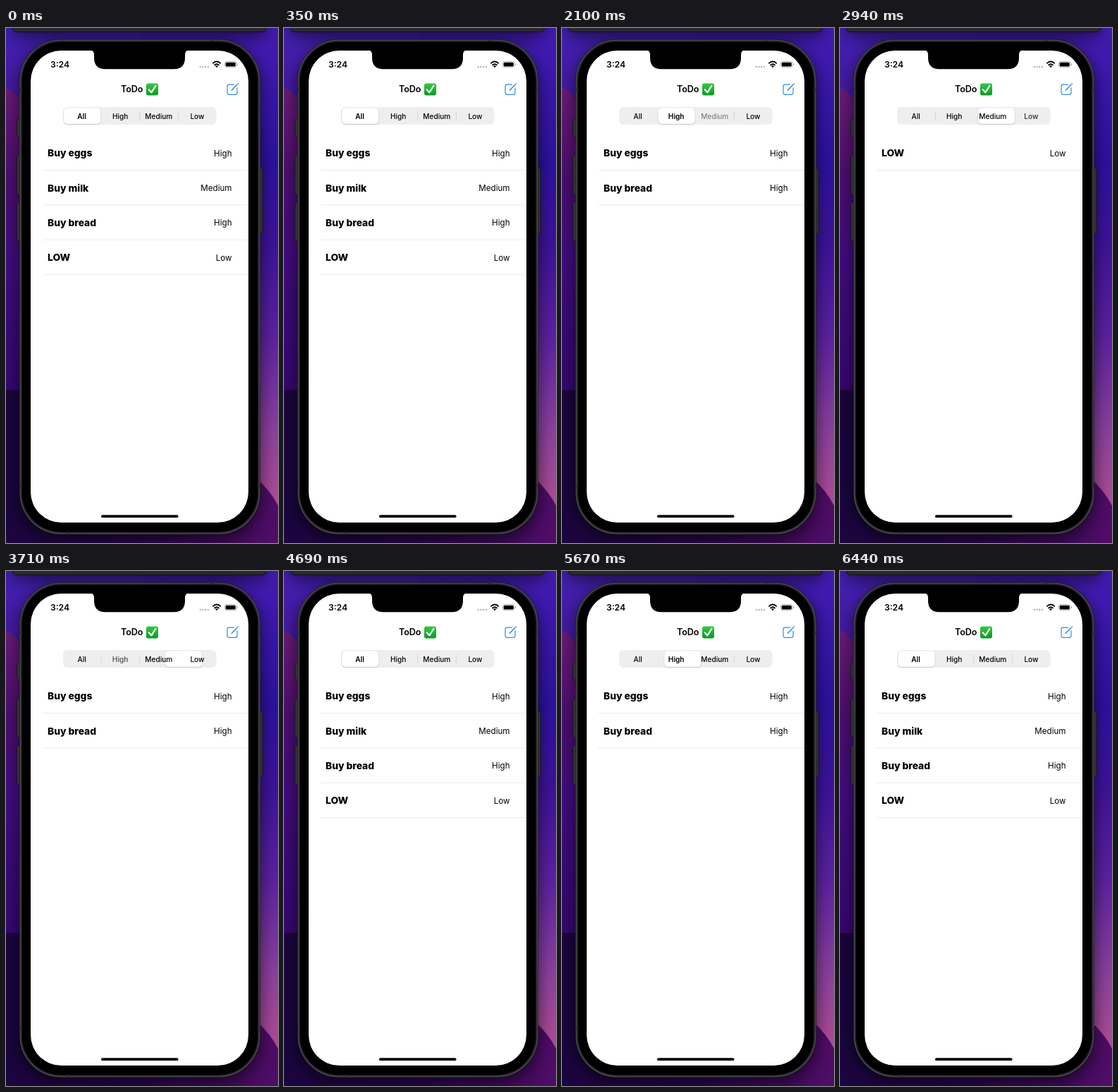
Recreate the animation shown at these times as an HTML page. Size 386 px wide and 730 px high, loop 7.35 s.

```html
<!DOCTYPE html>
<html lang="en">
<head>
<meta charset="utf-8">
<title>ToDo</title>
<style>
  html, body { margin: 0; width: 100%; height: 100%; overflow: hidden; background: #1b053f; }
  svg { display: block; width: 386px; height: 730px; font-family: Inter, Roboto, sans-serif; }
  .name { font-size: 13.8px; font-weight: 800; }
  .level { font-size: 11.6px; text-anchor: end; }
  .label { font-size: 10.1px; font-weight: 500; text-anchor: middle; }
</style>
</head>
<body>
<svg viewBox="0 0 386 730">
  <defs>
    <linearGradient id="left" x2="0" y2="1">
      <stop offset="0" stop-color="#4420b4"/><stop offset=".16" stop-color="#43189c"/>
      <stop offset=".4" stop-color="#390d80"/><stop offset="1" stop-color="#2d0760"/>
    </linearGradient>
    <linearGradient id="hill" x2="0" y2="1">
      <stop offset="0" stop-color="#6a1c78"/><stop offset=".3" stop-color="#4c0d70"/>
      <stop offset=".55" stop-color="#420c80"/><stop offset="1" stop-color="#350870"/>
    </linearGradient>
    <linearGradient id="right" x2="0" y2="1">
      <stop offset="0" stop-color="#441cb4"/><stop offset=".26" stop-color="#2d11a0"/>
      <stop offset=".42" stop-color="#3d139a"/><stop offset=".6" stop-color="#5d22a2"/>
      <stop offset=".78" stop-color="#8c419f"/><stop offset=".92" stop-color="#b04c96"/>
    </linearGradient>
    <linearGradient id="floor">
      <stop offset="0" stop-color="#1b053f"/><stop offset=".5" stop-color="#2b0650"/>
      <stop offset="1" stop-color="#500d68"/>
    </linearGradient>
    <linearGradient id="green" x2="0" y2="1">
      <stop offset="0" stop-color="#35c943"/><stop offset="1" stop-color="#0b9a24"/>
    </linearGradient>
    <filter id="shadow" x="-20%" y="-30%" width="140%" height="170%">
      <feDropShadow dx="0" dy="1" stdDeviation="1.2" flood-opacity=".2"/>
    </filter>
    <filter id="blur" filterUnits="userSpaceOnUse" x="-60" y="-60" width="506" height="850">
      <feGaussianBlur stdDeviation="12"/>
    </filter>
  </defs>

  <!-- Wallpaper with window shadows -->
  <rect width="193" height="730" fill="url(#left)"/>
  <path d="M0 84Q14 90 26 114V513H0Z" fill="url(#hill)"/>
  <rect x="193" width="193" height="730" fill="url(#right)"/>
  <rect y="513" width="193" height="217" fill="#1b053f"/>
  <path d="M0 700H300V600Q366 636 386 677V730H0Z" fill="url(#floor)"/>
  <g filter="url(#blur)">
    <rect x="10" y="-40" width="359" height="52" opacity=".6"/>
    <rect x="19" y="24" width="342" height="702" rx="58" opacity=".6"/>
  </g>
  <path d="M10-2H369V1Q369 5.500 364 5.500H15Q10 5.500 10 1Z" fill="#2a2730" stroke="#15101f"/>

  <!-- Phone -->
  <g fill="#303033" stroke="#151517" stroke-width=".8">
    <rect x="15.500" y="129" width="6" height="25" rx="1.500"/>
    <rect x="15.500" y="181" width="6" height="55" rx="1.500"/>
    <rect x="15.500" y="247" width="6" height="55" rx="1.500"/>
    <rect x="358" y="199" width="6" height="93" rx="1.500"/>
  </g>
  <rect x="19" y="16" width="342" height="702" rx="59" fill="#1b1b1d"/>
  <rect x="20.500" y="17.500" width="339" height="699" rx="57.500" fill="none" stroke="#48484a" stroke-width="1.600"/>
  <path d="M19 87h4M357 87h4M19 649h4M357 649h4M292 16v3M88 714v4" stroke="#29292b" stroke-width="3"/>
  <rect x="23" y="20" width="334" height="694" rx="55"/>
  <rect x="35" y="32" width="309" height="669" rx="43.500" fill="#fff"/>
  <path d="M120 31.500H259Q254 32 254 38V42Q254 58.300 238 58.300H141Q125 58.300 125 42V38Q125 32 120 31.500Z"/>

  <!-- Status bar -->
  <text x="76.500" y="56" font-size="12.2" font-weight="600" text-anchor="middle">3:24</text>
  <path d="M275.800 55h12" stroke="#b4b4b6" stroke-width="2.400" stroke-linecap="round" stroke-dasharray="0 3.700"/>
  <g fill="none" stroke="#000" stroke-width="1.800">
    <path d="M293.300 50.300Q299 44.800 304.700 50.300M295.500 52.800Q299 49.600 302.500 52.800"/>
  </g>
  <path d="M296.900 54.100Q299 52.400 301.100 54.100L299 56.300Z"/>
  <rect x="310.400" y="47.400" width="16.700" height="8.400" rx="2.600" fill="none" stroke="#a5a5a7" stroke-width=".8"/>
  <rect x="311.700" y="48.700" width="14.100" height="5.800" rx="1.500"/>
  <path d="M328.100 50v3.200q1.200-.5 1.200-1.600t-1.200-1.600" fill="#a5a5a7"/>

  <!-- Navigation bar -->
  <text x="163" y="91.300" font-size="12.6" font-weight="600" letter-spacing="-.1">ToDo</text>
  <rect x="199" y="78.500" width="17" height="17" rx="3" fill="url(#green)"/>
  <path d="M202.800 87.400L206.300 91.300L212.300 82" fill="none" stroke="#fff" stroke-width="2.300" stroke-linecap="round" stroke-linejoin="round"/>
  <g fill="none" stroke="#2f8ce2" stroke-width="1.200" stroke-linecap="round" stroke-linejoin="round">
    <path d="M323.500 80.200H316.500Q314 80.200 314 82.700V91.800Q314 94.300 316.500 94.300H325.500Q328 94.300 328 91.800V84.800"/>
    <path d="M320.300 88.200L328 80.300M329.300 79L329.400 78.900" stroke-width="1.600"/>
  </g>

  <!-- Segmented control -->
  <rect x="81" y="112" width="217.500" height="25" rx="6.200" fill="#eeeeef"/>
  <g id="dividers" stroke="#cfcfd3" stroke-width=".9"></g>
  <rect id="knob" y="113.500" width="51.500" height="22.300" rx="5" fill="#fff" filter="url(#shadow)"/>
  <g id="labels"></g>

  <g id="list"></g>
  <rect x="135" y="690.200" width="109.500" height="3.900" rx="1.950"/>
</svg>

<script>
const LOOP = 7350, PITCH = 54.6, ROW = 49.35;
const levels = ["All", "High", "Medium", "Low"];
const todos = [["Buy eggs", 1], ["Buy milk", 2], ["Buy bread", 1], ["LOW", 3]];
// Each tap: press time, release time, chosen segment
const taps = [
  [975, 1160, 1], [1945, 2140, 2], [2855, 2915, 3], [3555, 3670, 1],
  [4255, 4310, 0], [4885, 4945, 2], [5440, 5498, 1], [5985, 6065, 0]
];

const $ = id => document.getElementById(id);
const clamp = v => Math.max(0, Math.min(1, v));
const mix = (a, b, p) => a + (b - a) * p;

function add(parent, tag, attrs, text = "") {
  const el = document.createElementNS("http://www.w3.org/2000/svg", tag);
  for (const key in attrs) el.setAttribute(key, attrs[key]);
  el.textContent = text;
  return parent.appendChild(el);
}

const labels = levels.map((name, i) =>
  add($("labels"), "text", { class: "label", x: 107.6 + PITCH * i, y: 128.6 }, name));
const dividers = [1, 2, 3].map(i =>
  add($("dividers"), "path", { d: `M${80.6 + PITCH * i} 118.500v12` }));

// One prepared list per filter; only one is visible
const lists = levels.map((_, filter) => {
  const group = add($("list"), "g", {});
  todos.filter(todo => !filter || todo[1] === filter).forEach(([name, level], i) => {
    const y = ROW * i;
    add(group, "text", { class: "name", x: 59, y: 182.4 + y }, name);
    add(group, "text", { class: "level", x: 320.5, y: 181.7 + y }, levels[level]);
    add(group, "path", { d: `M52 ${201.6 + y}H344`, stroke: "#e6e6e8", "stroke-width": .8 });
  });
  return group;
});

// Critically damped spring from 0 to 1
function spring(ms) {
  const x = ms * .019;
  return 1 - (1 + x) * Math.exp(-x);
}

function dimming(t, index) {
  return Math.max(0, ...taps.filter(tap => tap[2] === index).map(([press, release]) =>
    .55 * clamp((Math.min(t, release) - press) / 100) * clamp(1 - (t - release) / 150)));
}

function draw(t) {
  const done = taps.filter(tap => tap[1] <= t);
  const [, since, selected] = done.at(-1) || [0, -1000, 0];
  const previous = done.length > 1 ? done.at(-2)[2] : 0;
  const fade = clamp((t - since) / 200);

  $("knob").setAttribute("x", 82.2 + PITCH * mix(previous, selected, spring(t - since)));
  labels.forEach((label, i) => {
    label.style.fontWeight = i === selected ? 600 : 500;
    label.style.opacity = 1 - dimming(t, i);
  });
  dividers.forEach((line, i) => {
    const shown = s => s === i || s === i + 1 ? 0 : 1;
    line.style.opacity = mix(shown(previous), shown(selected), fade);
  });
  lists.forEach((group, i) => group.style.display = i === selected ? "" : "none");
}

function tick() {
  draw(performance.now() % LOOP);
  requestAnimationFrame(tick);
}
tick();
</script>
</body>
</html>
```
